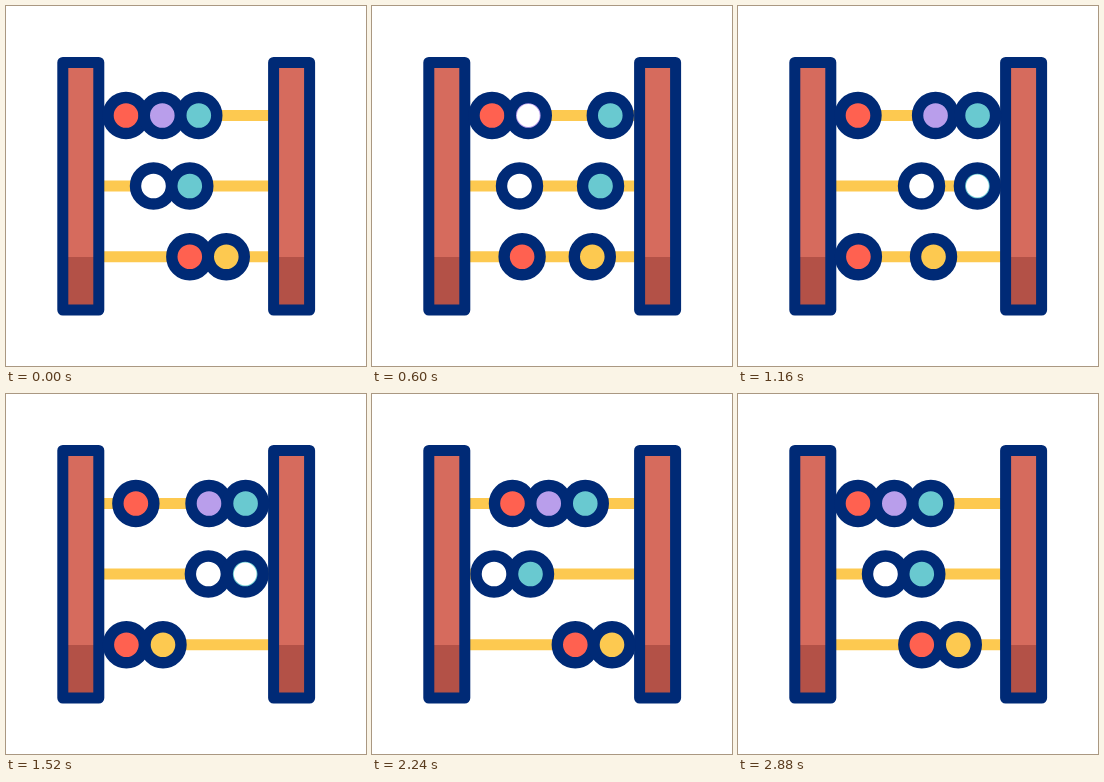
These frames come from a looping animation (360x360 px, 3 s). An HTML page:

```html
<!DOCTYPE html>
<html lang="en">
<head>
<meta charset="utf-8">
<title>Abacus</title>
<style>
  html, body { margin: 0; width: 100%; height: 100%; overflow: hidden; background: #fff; }
  svg { display: block; width: 100vw; height: 100vh; }
</style>
</head>
<body>
<svg id="stage" viewBox="0 0 360 360"></svg>
<script>
const NS = 'http://www.w3.org/2000/svg';
const LOOP = 3000, STEP = 40, MOVE = 480;
const NAVY = '#002a76', RED = '#ff6150', PURPLE = '#b99eeb', TEAL = '#69c9d0', YELLOW = '#fdc950';
const stage = document.getElementById('stage');

function add(tag, attrs, parent = stage) {
  const el = document.createElementNS(NS, tag);
  for (const k in attrs) el.setAttribute(k, attrs[k]);
  return parent.appendChild(el);
}

// Each bead: fill, rest position, then moves as [start time, destination].
// "pale" is the span in which the middle of the bead is white.
const rows = [
  { y: 109.5, beads: [
    { fill: RED, x: 120, moves: [[1378, 166.8], [1980, 120]] },
    { fill: PURPLE, x: 156.3, moves: [[782, 203], [1980, 156.3]], pale: [360, 1000] },
    { fill: TEAL, x: 192.8, moves: [[168, 239.6], [1980, 192.8]] }
  ] },
  { y: 180, beads: [
    { fill: '#fff', x: 147.5, moves: [[870, 202.6], [1505, 120], [2160, 147.5]] },
    { fill: TEAL, x: 183.8, moves: [[256, 239.4], [1505, 156.5], [2160, 183.8]], pale: [680, 1560] }
  ] },
  { y: 250.8, beads: [
    { fill: RED, x: 183.8, moves: [[350, 120.4], [1552, 203.3], [2330, 183.8]] },
    { fill: YELLOW, x: 220.3, moves: [[955, 157], [1552, 240], [2330, 220.3]] }
  ] }
];

function post(x) {
  add('rect', { x, y: 56.5, width: 36, height: 247.5, fill: '#d66b5d' });
  add('rect', { x, y: 251, width: 36, height: 53, fill: '#b35147' });
  add('rect', { x, y: 56.5, width: 36, height: 247.5, fill: 'none',
    stroke: NAVY, 'stroke-width': 11, 'stroke-linejoin': 'round' });
}

for (const { y } of rows) {
  add('line', { x1: 92, y1: y, x2: 268, y2: y, stroke: YELLOW, 'stroke-width': 11 });
}
post(56.8);
post(267.6);

for (const row of rows) {
  for (const bead of row.beads) {
    bead.el = add('g', {});
    add('circle', { r: 18, fill: bead.fill, stroke: NAVY, 'stroke-width': 11.4 }, bead.el);
    if (bead.pale) bead.core = add('circle', { r: 11.4, fill: '#fff' }, bead.el);
  }
}

function ease(p) {
  p = Math.min(1, Math.max(0, p));
  return p * p * (3 - 2 * p);
}

function beadX(bead, t) {
  let x = bead.x;
  for (const [start, to] of bead.moves) x += (to - x) * ease((t - start) / MOVE);
  return x;
}

function draw(time) {
  const t = Math.floor((time % LOOP) / STEP) * STEP;
  for (const { y, beads } of rows) {
    for (const bead of beads) {
      bead.el.setAttribute('transform', `translate(${beadX(bead, t).toFixed(2)} ${y})`);
      if (bead.core) {
        const [from, to] = bead.pale;
        bead.core.setAttribute('visibility', t >= from && t < to ? 'visible' : 'hidden');
      }
    }
  }
}

const begin = performance.now();
function tick() {
  draw(performance.now() - begin);
  requestAnimationFrame(tick);
}
tick();
</script>
</body>
</html>
```
